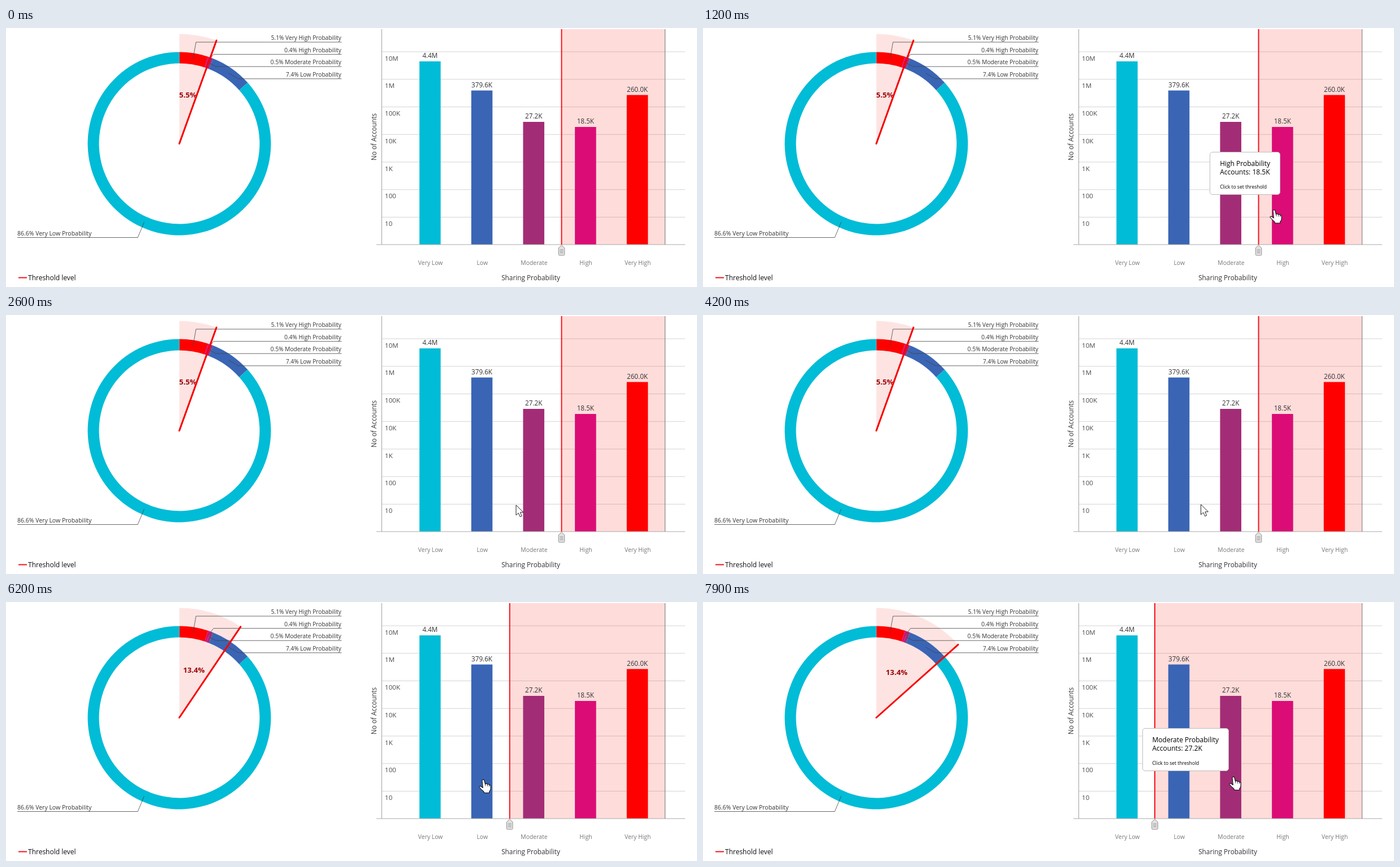
These frames come from a looping animation (1222x458 px, 8 s). An HTML page:

```html
<!DOCTYPE html>
<html lang="en">
<head>
<meta charset="utf-8">
<title>Sharing probability</title>
<style>
html, body { margin: 0; width: 100%; height: 100%; overflow: hidden; background: #fff; }
body { position: relative; font-family: "Open Sans", "Noto Sans", sans-serif; }
svg { position: absolute; left: 0; top: 0; width: 1222px; height: 458px; }
#tip {
  position: absolute; box-sizing: border-box; height: 76px; padding: 12px 17px;
  border: 1px solid #bdbdbd; border-radius: 5px; background: #fff; color: #000;
  font-size: 12px; line-height: 15px; white-space: nowrap;
}
#tip small { display: block; margin-top: 12px; font-size: 8.5px; line-height: 14px; }
</style>
</head>
<body>
<svg id="scene" viewBox="0 0 1222 458"></svg>
<div id="tip"><div id="name"></div><div id="count"></div><small>Click to set threshold</small></div>
<svg viewBox="0 0 1222 458">
  <g id="cursor" stroke-linejoin="round">
    <path id="arrow" fill="#fff" stroke="#222" d="M0 0V18L4.3 14.2L7.2 20.8L10.2 19.5L7.4 13H13Z"/>
    <g id="hand" stroke="#111" stroke-width="1.1">
      <path fill="#fff" d="M-2 2C-2 -.5 1.5 -.5 2 2L3.5 8C5 6.5 7 7 7.3 8.5C9 7.5 10.5 8.5 10.7 9.8C12 9 13 10 13.2 11.5L13 17Q12.8 19 11 20.5L10.5 23.5H1.5L1 21.5Q-3 18 -7 13.5C-7.5 11.5 -5 11 -3.5 12.5L-.7 14.5Z"/>
      <path fill="none" stroke-width=".8" d="M3.5 8L4.2 11.5M7.3 8.5L7.7 12M10.7 9.8L10.9 12.5"/>
    </g>
  </g>
</svg>
<script>
const $ = id => document.getElementById(id);
const CX = 306.5, CY = 204.5, TOP = 2, BASE = 383, RIGHT = 1165.5, BAR = 37.5;
const INK = '#333';

// name, account count, bar top, colour, share in percent
const groups = [
  ['Very Low', '4.4M', 59, '#00bcd6', 86.6],
  ['Low', '379.6K', 110.5, '#3a65b5', 7.4],
  ['Moderate', '27.2K', 166, '#a32c76', 0.5],
  ['High', '18.5K', 175, '#db0c76', 0.4],
  ['Very High', '260.0K', 118.5, '#ff0000', 5.1]
];
const barX = i => 749.9 + 91.65 * i;

// cursor path: step (100 ms), x, y
const path = [
  [5, 1110, 6], [6, 1105, 128], [7, 1103, 147], [9, 1082, 225], [11, 1030, 305],
  [13, 990, 338], [14, 970, 338], [15, 970, 338], [17, 948, 346], [19, 938, 372],
  [20, 941, 388], [21, 943, 380], [23, 934, 344], [25, 918, 336], [28, 870, 336],
  [29, 870, 336], [30, 863, 333], [31, 863, 333], [32, 879, 327], [41, 879, 327],
  [42, 880.5, 335], [44, 887, 355], [49, 887, 355], [52, 866, 321], [53, 866, 321],
  [54, 851, 315], [55, 844, 314], [70, 844, 314], [71, 842, 314], [73, 842, 314],
  [75, 868, 311], [77, 918, 308], [78, 939, 309], [79, 938, 309]
];
const CLICK = 60, WAKE = 74;

function polar(r, deg) {
  const a = deg * Math.PI / 180;
  return [CX + r * Math.sin(a), CY - r * Math.cos(a)];
}

function wedge(r, a) {
  return `M${CX} ${CY}V${CY - r}A${r} ${r} 0 0 1 ${polar(r, a)}Z`;
}

function ringPart(a, b) {
  const big = b - a > 180 ? 1 : 0;
  return `M${polar(162, a)}A162 162 0 ${big} 1 ${polar(162, b)}` +
    `L${polar(142, b)}A142 142 0 ${big} 0 ${polar(142, a)}Z`;
}

const line = (d, color, w = 1, extra = '') =>
  `<path d="${d}" fill="none" stroke="${color}" stroke-width="${w}" ${extra}/>`;
const text = (s, x, y, size, anchor = 'start', fill = INK, extra = '') =>
  `<text x="${x}" y="${y}" font-size="${size}" text-anchor="${anchor}" fill="${fill}" ${extra}>${s}</text>`;

function donut() {
  const elbows = [336, 367, 371, 411];
  let ring = '', notes = '', from = 0;
  [...groups].reverse().forEach(([name, , , color, share], i) => {
    const to = from + share * 3.6, end = polar(152, (from + to) / 2);
    const label = `${share}% ${name} Probability`;
    ring += `<path d="${ringPart(from, to)}" fill="${color}"/>`;
    if (i < 4) {
      const y = 25 + 21.6 * i;
      notes += line(`M593.5 ${y}H${elbows[i]}L${end}`, '#444', 0.8) + text(label, 593, y - 4, 10.2, 'end');
    } else {
      notes += line(`M20 370.5H233L${end}`, '#444', 0.8) + text(label, 20, 367, 10.5);
    }
    from = to;
  });
  return '<path id="wedge" fill="#fde4e2"/>' + ring + notes +
    text('', 0, 0, 13.2, 'middle', '#9c0006', 'id="share" font-weight="700"') +
    line('', '#f80000', 3, 'id="needle" stroke-linecap="round"') +
    line('M22 441.5H37', '#f5141a', 2) + text('Threshold level', 39, 445.5, 12, 'start', '#111');
}

function chart() {
  let grid = '', bars = '';
  ['10M', '1M', '100K', '10K', '1K', '100', '10'].forEach((s, i) => {
    const y = 42 + 48.75 * i;
    grid += line(`M664 ${y}H1201`, '#d4d4d4') + text(s, 670, y + 15.6, 11.6, 'start', '#4a4a4a');
  });
  groups.forEach(([name, count, top, color], i) => {
    const x = barX(i);
    bars += `<rect x="${x - BAR / 2}" y="${top}" width="${BAR}" height="${BASE - top}" fill="${color}"/>` +
      text(count, x, top - 6, 11.7, 'middle') + text(name, x + 0.7, 419, 10.4, 'middle', '#777');
  });
  return grid + `<rect id="zone" y="${TOP}" height="${BASE - TOP}" fill="#f5140a" fill-opacity=".15"/>` +
    line(`M664.5 ${TOP}V${BASE}`, '#a0a0a0') + bars +
    line(`M655 ${BASE}H1201`, '#a8a8a8') + line(`M${RIGHT} ${TOP}V${BASE}`, '#777') +
    '<g id="slider">' + line(`M0 ${TOP}V${BASE}`, '#f5141a', 2) +
    '<path d="M0 384L5.3 389V400.5Q5.3 402 3.8 402H-3.8Q-5.3 402 -5.3 400.5V389Z" fill="#e2e2e2" stroke="#909090"/>' +
    line('M-3 392H3M-3 394.8H3M-3 397.6H3', '#909090') + '</g>' +
    text('Sharing Probability', 928, 445.5, 11.8, 'middle') +
    text('No of Accounts', 0, 0, 11.8, 'middle', INK, 'transform="translate(654.5 192.5) rotate(-90)"');
}

function cursorAt(step) {
  const i = path.findIndex(k => k[0] >= step);
  if (step < path[0][0] || i < 0) return null;
  const b = path[i], a = path[Math.max(0, i - 1)];
  const p = b === a ? 0 : (step - a[0]) / (b[0] - a[0]);
  return [a[1] + (b[1] - a[1]) * p, a[2] + (b[2] - a[2]) * p];
}

function barUnder(pos) {
  return pos ? groups.findIndex((g, i) =>
    Math.abs(pos[0] - barX(i)) <= BAR / 2 && pos[1] >= g[2] && pos[1] <= BASE) : -1;
}

const ease = p => p < 0.5 ? 4 * p ** 3 : 1 - 4 * (1 - p) ** 3;

function drawThreshold(step) {
  const p = ease(Math.min(1, Math.max(0, (step - CLICK + 0.5) / 5)));
  const angle = 19.8 + 28.44 * p, x = 982.5 - 183.5 * p;
  const [lx, ly] = polar(88, angle / 2);
  $('wedge').setAttribute('d', wedge(194, angle));
  $('needle').setAttribute('d', `M${CX} ${CY}L${polar(194, angle)}`);
  $('share').setAttribute('x', lx);
  $('share').setAttribute('y', ly + 5);
  $('share').textContent = step < CLICK ? '5.5%' : '13.4%';
  $('zone').setAttribute('x', x);
  $('zone').setAttribute('width', RIGHT - x);
  $('slider').setAttribute('transform', `translate(${x})`);
}

function drawPointer(step) {
  const pos = cursorAt(step), last = cursorAt(step - 1), bar = barUnder(pos);
  $('cursor').style.display = pos ? '' : 'none';
  if (pos) $('cursor').setAttribute('transform', `translate(${pos})`);
  $('hand').style.display = bar < 0 ? 'none' : '';
  $('arrow').style.display = bar < 0 ? '' : 'none';

  // the tooltip trails the pointer by one step and stays away after a click
  const open = bar >= 0 && barUnder(last) === bar && (step < CLICK || step >= WAKE);
  $('tip').style.display = open ? '' : 'none';
  if (!open) return;
  $('name').textContent = groups[bar][0] + ' Probability';
  $('count').textContent = 'Accounts: ' + groups[bar][1];
  $('tip').style.right = `calc(100% - ${last[0] - 9}px)`;
  $('tip').style.bottom = `calc(100% - ${last[1] - 10}px)`;
}

function frame(now) {
  const step = Math.floor(now % 8000 / 100);
  drawThreshold(step);
  drawPointer(step);
  requestAnimationFrame(frame);
}

$('scene').innerHTML = donut() + chart();
let start;
requestAnimationFrame(function first(now) {
  start = now;
  frame(0);
});
const rawFrame = frame;
frame = now => rawFrame(Math.max(0, now - (start || 0)));
</script>
</body>
</html>
```
